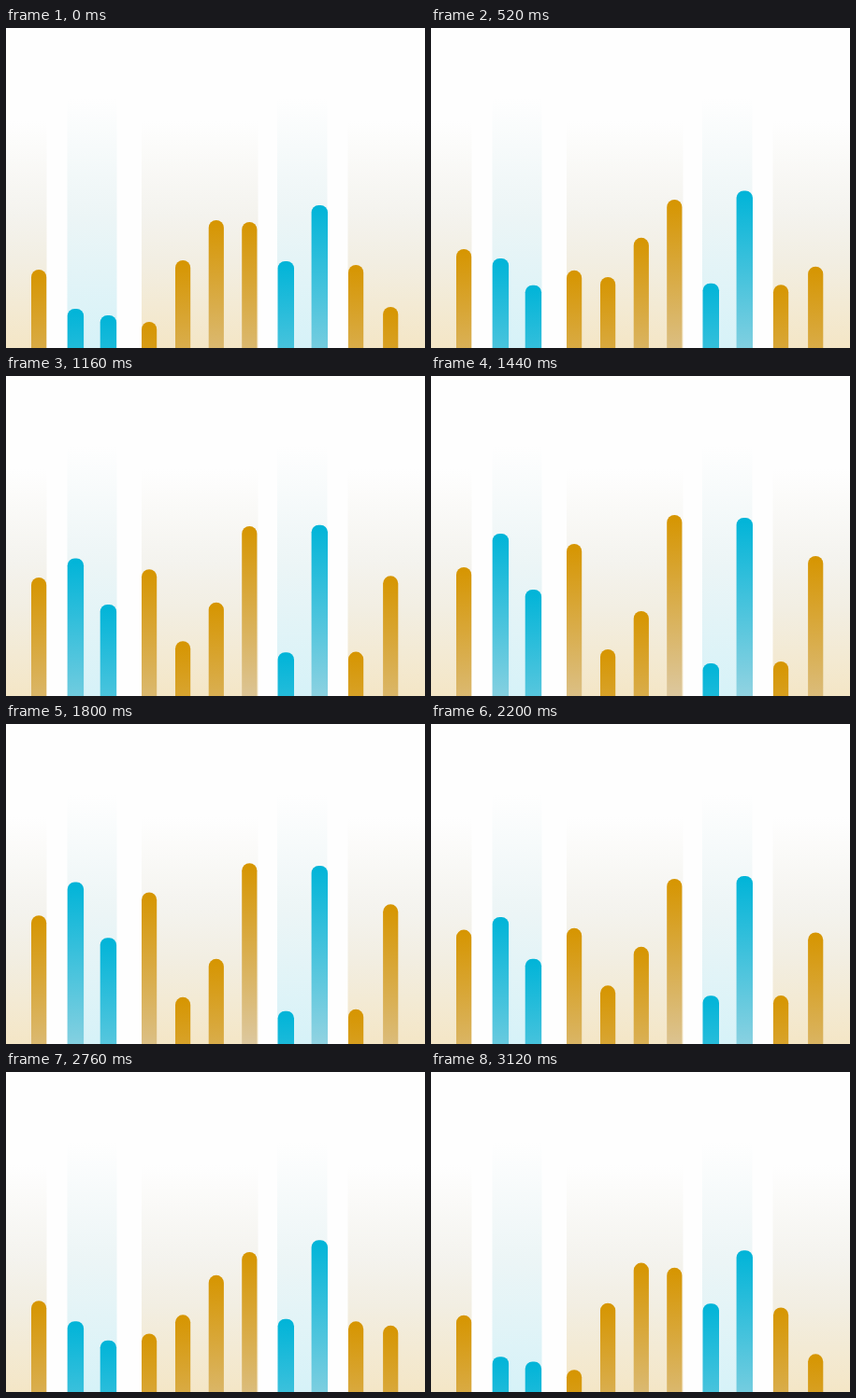
Write an HTML page that moves like this. It is 448 px wide and 343 px high and loops after 3160 ms.

```html
<!DOCTYPE html>
<html lang="en">
<head>
<meta charset="utf-8">
<title>Bars</title>
<style>
  html, body { margin: 0; width: 100%; height: 100%; overflow: hidden; background: #fefefe; }
  svg { display: block; width: 448px; height: 343px; }
</style>
</head>
<body>
<svg id="stage" viewBox="0 0 448 343">
  <defs>
    <linearGradient id="goldPanel" gradientUnits="userSpaceOnUse" x1="0" y1="100" x2="0" y2="343">
      <stop offset="0" stop-color="#fefefe"/>
      <stop offset=".41" stop-color="#f4f3ee"/>
      <stop offset=".62" stop-color="#f2eee2"/>
      <stop offset="1" stop-color="#f4e6c6"/>
    </linearGradient>
    <linearGradient id="bluePanel" gradientUnits="userSpaceOnUse" x1="0" y1="75" x2="0" y2="343">
      <stop offset="0" stop-color="#fefefe"/>
      <stop offset=".47" stop-color="#ecf5f6"/>
      <stop offset="1" stop-color="#d6f2f8"/>
    </linearGradient>
    <linearGradient id="goldBar" gradientUnits="userSpaceOnUse" x1="0" y1="0" x2="0" y2="250">
      <stop offset="0" stop-color="#d69500"/>
      <stop offset="1" stop-color="#ded6cc"/>
    </linearGradient>
    <linearGradient id="blueBar" gradientUnits="userSpaceOnUse" x1="0" y1="0" x2="0" y2="250">
      <stop offset="0" stop-color="#00b4d8"/>
      <stop offset="1" stop-color="#bedce4"/>
    </linearGradient>
  </defs>
</svg>
<script>
const stage = document.getElementById('stage');
const LOOP = 3160, TICK = 40, SPAN = 32;

// left, right, colour
const panels = [
  [0, 43.5, 'gold'], [65.5, 118.5, 'blue'], [145, 269.5, 'gold'],
  [290, 343.5, 'blue'], [365.5, 448, 'gold']
];

// left, colour, top at phase 0, top at phase SPAN
const bars = [
  [27, 'gold', 259, 205], [65.7, 'blue', 301, 169], [100.7, 'blue', 308, 229],
  [145, 'gold', 315, 180], [181, 'gold', 249, 293], [216.7, 'gold', 206, 252],
  [252.2, 'gold', 208, 149], [290.6, 'blue', 250, 308], [326.6, 'blue', 190, 152],
  [366, 'gold', 254, 306], [403.1, 'gold', 299, 193]
];

// time in ms, phase: linear rise and fall with two short holds
const keys = [
  [0, 0], [520, 13.07], [560, 13.07], [840, 19.1], [880, 19.1], [1440, 32],
  [1620, 36], [2200, 22.8], [2760, 8.2], [3120, -1], [LOOP, 0]
];

function addRect(attrs) {
  const rect = document.createElementNS('http://www.w3.org/2000/svg', 'rect');
  for (const name in attrs) rect.setAttribute(name, attrs[name]);
  return stage.appendChild(rect);
}

for (const [left, right, colour] of panels) {
  addRect({ x: left, y: 60, width: right - left, height: 283, fill: `url(#${colour}Panel)` });
}

const barRects = bars.map(([x, colour]) => addRect({
  x, y: 0, width: colour === 'gold' ? 16.2 : 17.4, height: 300,
  rx: colour === 'gold' ? 8.1 : 7.6, fill: `url(#${colour}Bar)`
}));

function phaseAt(time) {
  const i = keys.findIndex(key => key[0] > time);
  const [t0, p0] = keys[i - 1], [t1, p1] = keys[i];
  return p0 + (p1 - p0) * (time - t0) / (t1 - t0);
}

function draw(time) {
  const phase = phaseAt(Math.floor(time % LOOP / TICK) * TICK);
  bars.forEach(([, , low, high], i) => {
    const top = low + (high - low) * phase / SPAN;
    barRects[i].setAttribute('transform', `translate(0 ${top.toFixed(2)})`);
  });
}

const start = performance.now();
function frame() {
  draw(performance.now() - start);
  requestAnimationFrame(frame);
}
frame();
</script>
</body>
</html>
```
